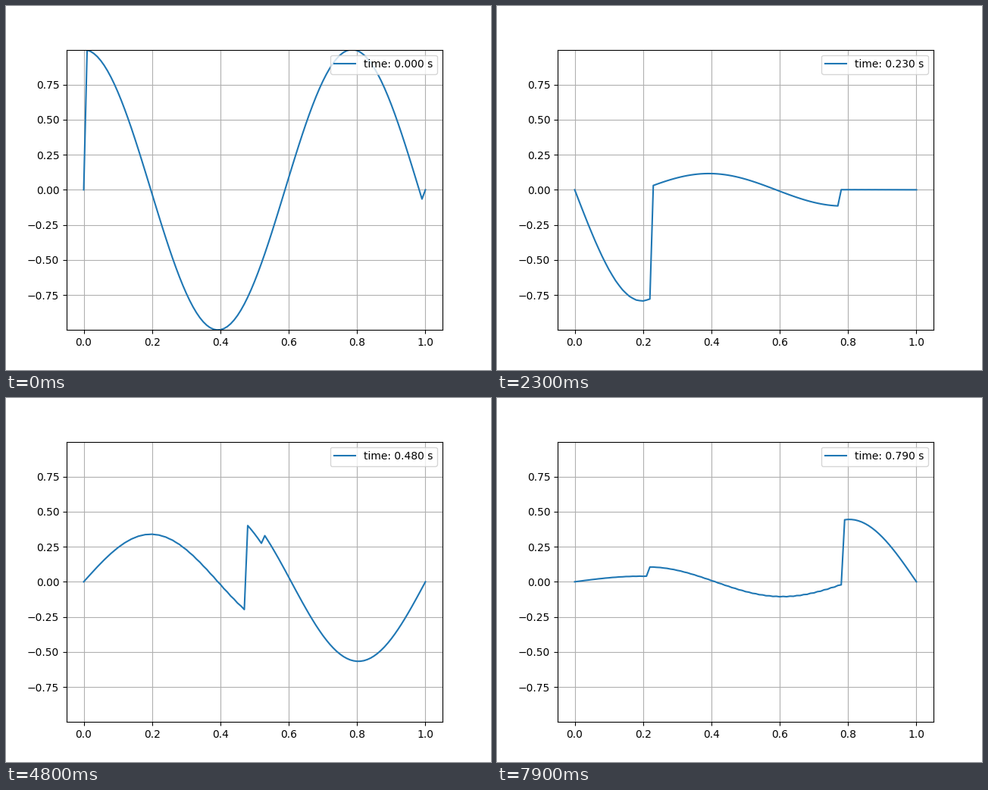
Animation, 640 px wide and 480 px high, one loop 8000 ms. Source, as a matplotlib script:

```python
import numpy as np
import matplotlib.pyplot as plt
from matplotlib.animation import FuncAnimation

FRAMES = 80
N = 100
h = 1 / N  # space step, and time step as well: Courant number 1


def solve(steps):
    """Damped wave u_tt + 2 u_t + u = u_xx with both ends held at zero."""
    u = np.zeros((steps, N + 1))
    start = np.cos(8 * x[1:-1])
    u[0, 1:-1] = start
    u[1, 1:-1] = start * (1 - 65 * h**2 / 2)
    for n in range(1, steps - 1):
        u[n + 1, 1:-1] = (u[n, 2:] + u[n, :-2] - (1 - h) * u[n - 1, 1:-1]
                          - h**2 * u[n, 1:-1]) / (1 + h)
    return u


x = np.linspace(0, 1, N + 1)
u = solve(FRAMES)

fig, ax = plt.subplots(figsize=(6.4, 4.8), dpi=100)
line, = ax.plot(x, u[0], label="time: 0.000 s")
ax.set_ylim(u.min(), u.max())
ax.grid(True)
label = ax.legend(loc="upper right").get_texts()[0]


def update(n):
    line.set_ydata(u[n])
    label.set_text(f"time: {n * h:.3f} s")
    return line, label


anim = FuncAnimation(fig, update, frames=FRAMES, interval=100,
                     repeat=True, repeat_delay=0)
plt.show()
```
